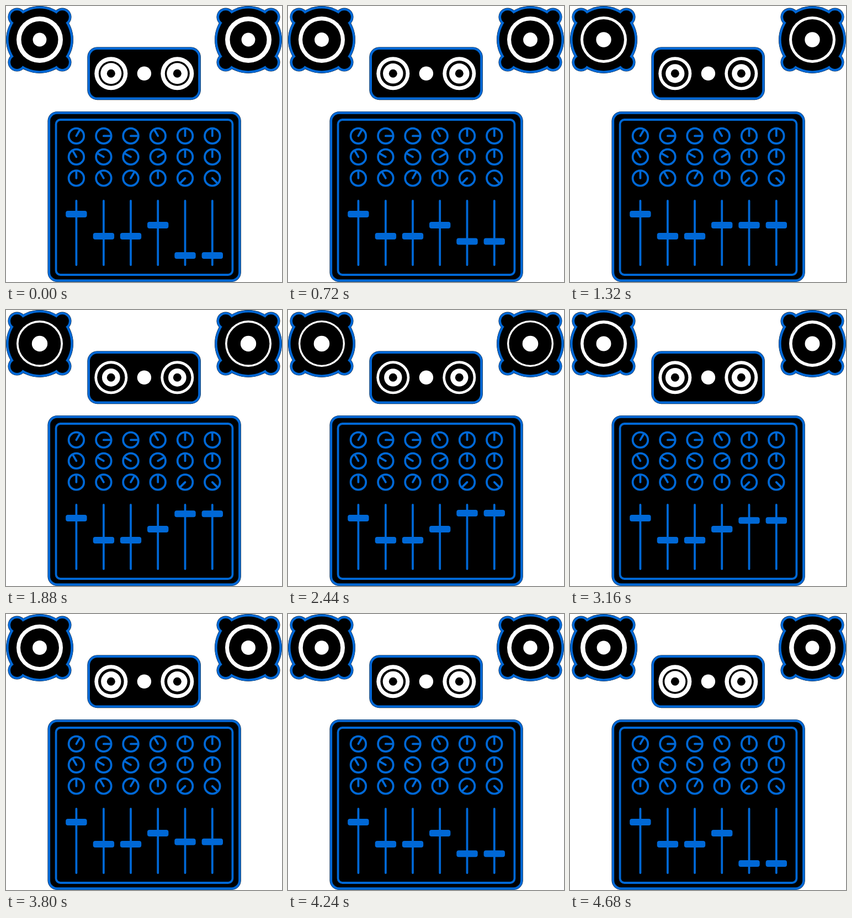
An HTML page with a canvas for the animation above (4.8 s loop, 500 by 500 pixels).

```html
<!DOCTYPE html>
<html>
<head>
<meta charset="utf-8">
<style>
html, body { margin: 0; height: 100%; overflow: hidden; background: #fff; }
canvas { display: block; }
</style>
</head>
<body>
<canvas id="stage" width="500" height="500"></canvas>
<script>
const ctx = document.getElementById('stage').getContext('2d');
const BLUE = '#0068d6', BLACK = '#000', WHITE = '#fff';
const LOOP = 4800, STEP = 40, START = 120, END = 4680, BEAT = 520;
const REST_CONE = 33.5;
const COLUMNS = [127.4, 176.9, 226, 275.2, 324.5, 373.8];
const KNOBS = [
  { y: 235.4, angles: [30, 90, 90, -30, 0, 0] },
  { y: 273.4, angles: [-30, -60, -60, 60, 0, 0] },
  { y: 311.9, angles: [0, -30, 30, 0, -135, 135] }
];
const FIXED_FADERS = [377, 417, 417, 397];
const FADER_LOW = 452, FADER_HIGH = 368;
// Insets of the dark rim, the blue border and the black body.
const LAYERS = [[0, BLACK], [0.4, BLUE], [4.6, BLACK]];

const clamp = v => Math.max(0, Math.min(1, v));

function disc(x, y, r, color) {
  ctx.fillStyle = color;
  ctx.beginPath();
  ctx.arc(x, y, r, 0, 2 * Math.PI);
  ctx.fill();
}

function box(x, y, w, h, r, color) {
  ctx.fillStyle = color;
  ctx.beginPath();
  ctx.roundRect(x, y, w, h, r);
  ctx.fill();
}

function line(x1, y1, x2, y2) {
  ctx.beginPath();
  ctx.moveTo(x1, y1);
  ctx.lineTo(x2, y2);
  ctx.stroke();
}

function panel(x, y, w, h, r) {
  for (const [d, color] of LAYERS)
    box(x + d, y + d, w - 2 * d, h - 2 * d, r - d, color);
}

function speaker(x, y, cone) {
  for (const [d, color] of LAYERS) {
    disc(x, y, 61 - d, color);
    for (const dx of [-41, 41])
      for (const dy of [-41, 41]) disc(x + dx, y + dy, 16.5 - d, color);
  }
  disc(x, y, 42, WHITE);
  disc(x, y, cone, BLACK);
  disc(x, y, cone * 0.37, WHITE);
}

// The black ring thickens both ways as the cone moves out.
function tweeter(x, y, ring) {
  disc(x, y, 30, WHITE);
  disc(x, y, 20.75 + ring / 2, BLACK);
  disc(x, y, 20.75 - ring / 2, WHITE);
  disc(x, y, 7.5, BLACK);
}

function mixer(faderY) {
  panel(75.5, 191.2, 350.2, 308.6, 17);
  ctx.strokeStyle = BLUE;
  ctx.lineWidth = 3.8;
  ctx.lineCap = 'round';
  ctx.beginPath();
  ctx.roundRect(90.6, 206, 319.8, 281, 8);
  ctx.stroke();

  for (const { y, angles } of KNOBS)
    angles.forEach((deg, i) => {
      const x = COLUMNS[i], a = deg * Math.PI / 180;
      ctx.beginPath();
      ctx.arc(x, y, 13.8, 0, 2 * Math.PI);
      ctx.stroke();
      line(x, y, x + 12 * Math.sin(a), y - 12 * Math.cos(a));
    });

  COLUMNS.forEach((x, i) => {
    line(x, 353, x, 469);
    box(x - 19.2, (FIXED_FADERS[i] ?? faderY) - 6, 38.4, 12, 4, BLUE);
  });
}

function draw(t) {
  // Volume rises, holds and falls symmetrically around the middle of the loop.
  const level = clamp((2200 - Math.abs(t - LOOP / 2)) / 1707);
  const playing = t > START && t < END;
  const beat = playing ? (1 - Math.cos(2 * Math.PI * (t - START) / BEAT)) / 2 : 0;
  const push = 2.8 * level + 2.4 * beat;

  ctx.fillStyle = WHITE;
  ctx.fillRect(0, 0, 500, 500);
  for (const x of [61, 439]) speaker(x, 61, REST_CONE + push);
  panel(147.4, 74.4, 205.4, 95.8, 18);
  for (const x of [190.3, 310.3]) tweeter(x, 122.3, 3.5 + 1.1 * push);
  disc(250.4, 122.3, 12.7, WHITE);
  mixer(FADER_LOW + (FADER_HIGH - FADER_LOW) * level);
}

const origin = performance.now();
function tick() {
  const t = (performance.now() - origin) % LOOP;
  draw(Math.floor(t / STEP) * STEP);
  requestAnimationFrame(tick);
}
tick();
</script>
</body>
</html>
```
